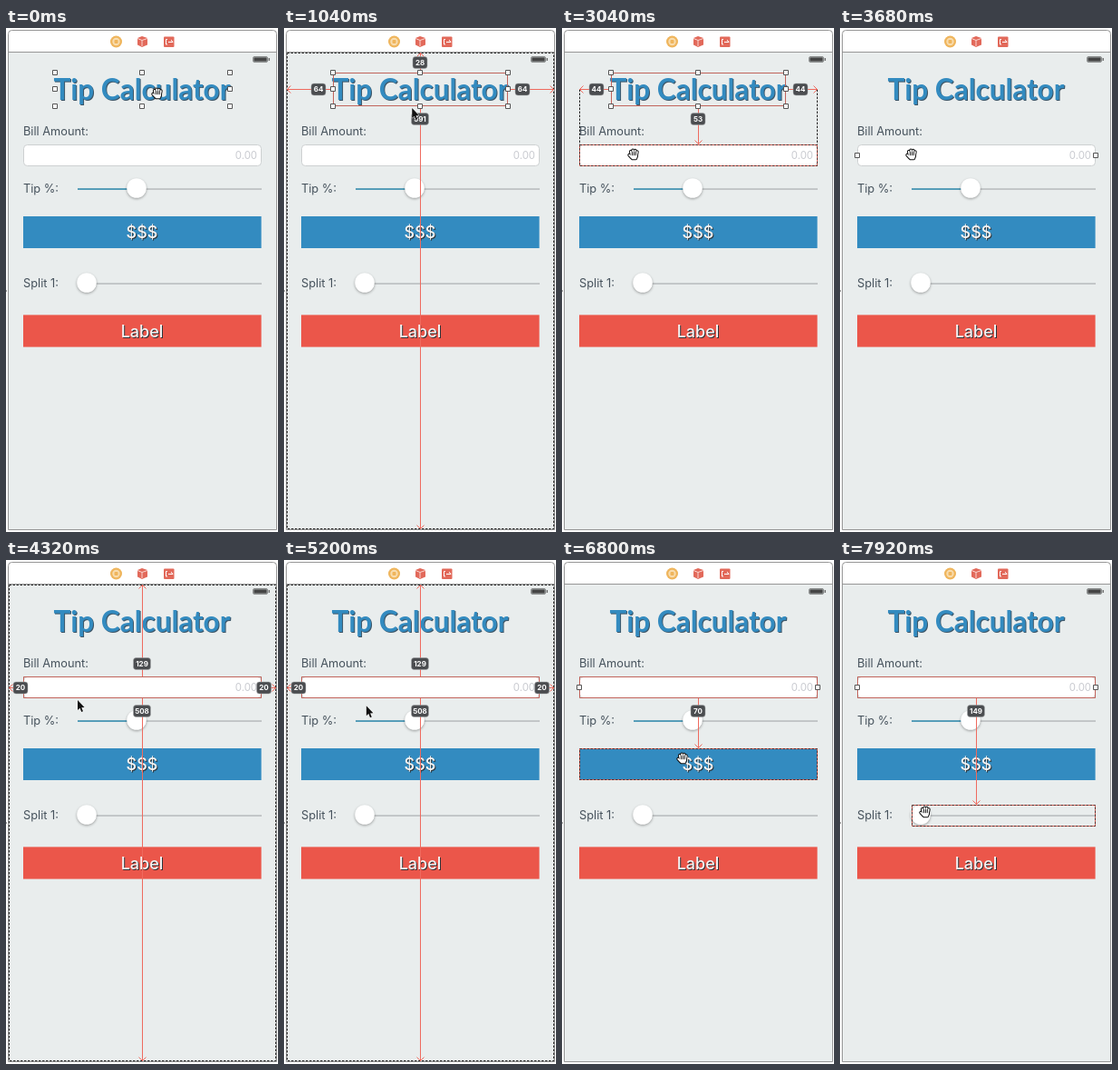
An HTML page with a canvas for the animation above (8000 ms loop, 300 by 554 pixels).

```html
<!DOCTYPE html>
<html>
<head>
<meta charset="utf-8">
<style>
html, body { margin: 0; width: 100%; height: 100%; overflow: hidden; background: #fff; }
canvas { display: block; }
</style>
</head>
<body>
<canvas width="300" height="554"></canvas>
<script>
const c = document.querySelector('canvas').getContext('2d');
const LOOP = 8000, BLUE = '#338bc0', RED = '#eb564a', LINE = '#ef6a5e', BG = '#e9eded';

// Boxes as left, top, right, bottom
const view = [3, 27, 298, 551], title = [54, 49, 247, 86], field = [19, 128, 282, 152],
  slider = [79, 165, 282, 188], total = [19, 207, 282, 242],
  split = [79, 269, 282, 293], label = [19, 315, 282, 351];
const items = [title, field, slider, total, split, label];

// Distances in points, in the order left, top, right, bottom
const gaps = new Map([
  [title, new Map([[view, [64, 28, 64, 591]], [field, [44, 0, 44, 53]]])],
  [field, new Map([[view, [20, 129, 20, 508]], [slider, [0, 0, 0, 16]],
    [total, [0, 0, 0, 70]], [split, [0, 0, 0, 149]]])]
]);

// Pointer stops: time, x, y
const stops = [[0, 167, 72], [700, 167, 72], [1500, 101, 113], [2350, 101, 113],
  [2900, 79, 139], [3750, 79, 139], [4200, 79, 154], [5000, 79, 154],
  [5700, 138, 185], [6100, 138, 185], [6650, 133, 218], [7000, 133, 218],
  [7700, 94, 277], [8000, 94, 277]];

function pointer(t) {
  const i = stops.findIndex(s => s[0] > t);
  const [a, b] = [stops[i - 1], stops[i]];
  let k = (t - a[0]) / (b[0] - a[0]);
  k = k * k * (3 - 2 * k);
  return [a[1] + (b[1] - a[1]) * k, a[2] + (b[2] - a[2]) * k];
}

function text(s, x, y, font, color, align = 'left') {
  c.font = font;
  c.textAlign = align;
  c.fillStyle = color;
  c.fillText(s, x, y);
}

function embossed(s, y, font, color, shade) {
  text(s, 151, y + .8, font, shade, 'center');
  text(s, 150, y, font, color, 'center');
}

function round(x, y, w, h, r, fill, stroke) {
  c.beginPath();
  c.roundRect(x, y, w, h, r);
  if (fill) { c.fillStyle = fill; c.fill(); }
  if (stroke) { c.strokeStyle = stroke; c.stroke(); }
}

function disc(x, y, r, color) {
  c.beginPath();
  c.arc(x, y, r, 0, 7);
  c.fillStyle = color;
  c.fill();
}

function path(points, color, dash = []) {
  c.beginPath();
  for (const p of points) c.lineTo(...p);
  c.strokeStyle = color;
  c.setLineDash(dash);
  c.stroke();
  c.setLineDash([]);
}

function outline([l, t, r, b], color, dash) {
  const x = l + .5, y = t + .5, X = r - .5, Y = b - .5;
  path([[x, y], [X, y], [X, Y], [x, Y], [x, y]], color, dash);
}

function track([l, t, r], y, knob) {
  c.fillStyle = '#b7bbbd';
  c.fillRect(l, y - .7, r - l, 1.5);
  c.fillStyle = '#3591b4';
  c.fillRect(l, y - .7, knob - l - 10, 1.5);
  c.save();
  c.shadowColor = '#0005';
  c.shadowBlur = 3;
  c.shadowOffsetY = 1.2;
  disc(knob, y - 1, 10.8, '#fff');
  c.restore();
}

function screen() {
  c.fillStyle = '#fff';
  c.fillRect(0, 0, 300, 554);
  c.fillStyle = '#999';
  c.fillRect(0, 288, 1, 2);
  round(2.5, 2.5, 296, 549, [4, 4, 0, 0], '#fff', '#969696');
  c.fillStyle = BG;
  c.fillRect(3, 27, 295, 524);
  path([[3, 26.5], [298, 26.5]], '#969696');

  disc(121.5, 15, 6.5, '#efb55c');
  disc(121.5, 15, 4.2, '#f8dcae');
  round(119.5, 13, 4, 4, 1, '#efb55c');
  c.beginPath();
  for (const p of [[150, 9], [156, 11], [156, 18.5], [150, 21], [145, 18.5], [145, 11]]) c.lineTo(...p);
  c.fillStyle = '#e2695a';
  c.fill();
  path([[145, 11.5], [150, 13.5], [156, 11.5]], '#fbd5cf');
  path([[150, 13.5], [150, 20]], '#fbd5cf');
  round(174, 9.5, 11.5, 11.5, 1, '#e2695a');
  path([[178, 12.5], [176.5, 12.5], [176.5, 18], [178, 18]], '#fff');
  path([[179, 15.5], [184, 15.5], [182, 13]], '#fff');

  round(272.5, 31.5, 16, 6, 1.5, '#a5a8a8', '#8a8d8d');
  round(273.5, 32.5, 14, 4, .5, '#444');
  c.fillStyle = '#777';
  c.fillRect(289.5, 33, 1.5, 3);

  embossed('Tip Calculator', 79, 'bold 31.5px Lato, sans-serif', BLUE, '#3d5668');
  const small = '12.8px Inter, sans-serif', ink = '#46525c';
  text('Bill Amount:', 19, 118, small, ink);
  text('Tip %:', 19, 180.5, small, ink);
  text('Split 1:', 19, 285, small, ink);
  round(19.5, 128.5, 262, 23, 4, '#fff', '#cdd0d1');
  text('0.00', 277, 143.5, '11.4px Inter, sans-serif', '#c9cbd0', 'right');
  track(slider, 177, 144);
  track(split, 281, 89);
  c.fillStyle = BLUE;
  c.fillRect(19, 207, 262.6, 35);
  c.fillStyle = RED;
  c.fillRect(19, 315.4, 262.6, 35.2);
  const big = '500 18px Inter, sans-serif';
  embossed('$$$', 231, big, '#f4f4f4', '#2c3338');
  embossed('Label', 340, big, '#f4f4f4', '#2c3338');
}

function handles([l, t, r, b], sides) {
  const m = (t + b) / 2;
  const spots = sides ? [[l, m], [r, m]]
    : [[l, t], [150, t], [r, t], [l, m], [r, m], [l, b], [150, b], [r, b]];
  for (const [x, y] of spots)
    round(Math.floor(x) - 2.5, Math.floor(y) - 2.5, 5, 5, 0, '#fff', '#555');
}

function arrow(x1, y1, x2, y2) {
  path([[x1, y1], [x2, y2]], LINE);
  const dx = Math.sign(x2 - x1) * 4, dy = Math.sign(y2 - y1) * 4;
  path([[x2 - dx - dy, y2 - dy - dx], [x2, y2], [x2 - dx + dy, y2 - dy + dx]], LINE);
}

function tag(n, x, y) {
  const w = n > 99 ? 19 : 16;
  round(x - w / 2, y - 6.5, w, 13, 3, '#4b4d50', '#a6a8aa80');
  text(n, x, y + 2.9, 'bold 8px Inter, sans-serif', '#fff', 'center');
}

function measure(from, to) {
  const [l, t, r, b] = from, [L, T, R, B] = to;
  const x = 150.5, y = Math.floor((t + b) / 2) + .5;
  const [left, top, right, bottom] = gaps.get(from).get(to);
  const end = to === view ? B : T;
  const offset = d => Math.min(14, d - 11);

  outline(from, LINE);
  outline(from, '#5559', [1, 1]);
  if (to !== view) outline(to, LINE);
  outline(to, to === view ? '#222' : '#222b', [2.5, 1.5]);
  if (left && to !== view)
    for (const e of [L + .5, R - .5]) path([[e, y], [e, T]], '#222', [2.5, 1.5]);

  if (left) { arrow(l, y, L + .5, y); arrow(r, y, R - .5, y); }
  if (top) arrow(x, t, x, T + .5);
  arrow(x, b, x, end - .5);
  handles(from, from === field);
  if (left) {
    tag(left, Math.max(16, l - 16), y);
    tag(right, Math.min(284.5, r + 16), y);
  }
  if (top) tag(top, 150, t - offset(t - T));
  tag(bottom, 150, b + offset(end - b));
}

function hand(x, y) {
  c.save();
  c.translate(x, y);
  c.lineCap = c.lineJoin = 'round';
  const fingers = [[-3.2, -3.2], [-.8, -4.6], [1.6, -4.4], [3.8, -2.8]];
  for (const [width, color] of [[3.8, '#111'], [1.8, '#fff']]) {
    c.lineWidth = width;
    fingers.forEach((f, i) => path([f, [i * 1.6 - 2, 2]], color));
    path([[-4.8, .6], [-2, 3.6]], color);
    path([[-2, 2], [3.2, 1.5], [2.2, 4.4], [-1, 4.4], [-2, 2]], color);
  }
  c.fillStyle = '#fff';
  c.fillRect(-2, 1, 5, 3.5);
  c.lineWidth = .9;
  for (const i of [-1.6, .4, 2.3]) path([[i, -2.5], [i, .8]], '#111');
  c.restore();
}

function arrowCursor(x, y) {
  c.beginPath();
  for (const [a, b] of [[0, 0], [0, 11], [2.5, 8.8], [4.2, 13], [6, 12.2], [4.3, 8.2], [7.6, 8]])
    c.lineTo(x + a, y + b);
  c.closePath();
  c.strokeStyle = '#fff';
  c.stroke();
  c.fillStyle = '#111';
  c.fill();
}

function draw(t) {
  const [x, y] = pointer(t);
  const chosen = t < 3500 ? title : field;
  const over = items.find(([l, t, r, b]) => x >= l && x <= r && y >= t && y <= b) || view;
  c.lineWidth = 1;
  screen();
  if (over === chosen) handles(chosen, chosen === field);
  else measure(chosen, over);
  (over === view ? arrowCursor : hand)(x, y);
}

function tick() {
  draw(performance.now() % LOOP);
  requestAnimationFrame(tick);
}
tick();
</script>
</body>
</html>
```
